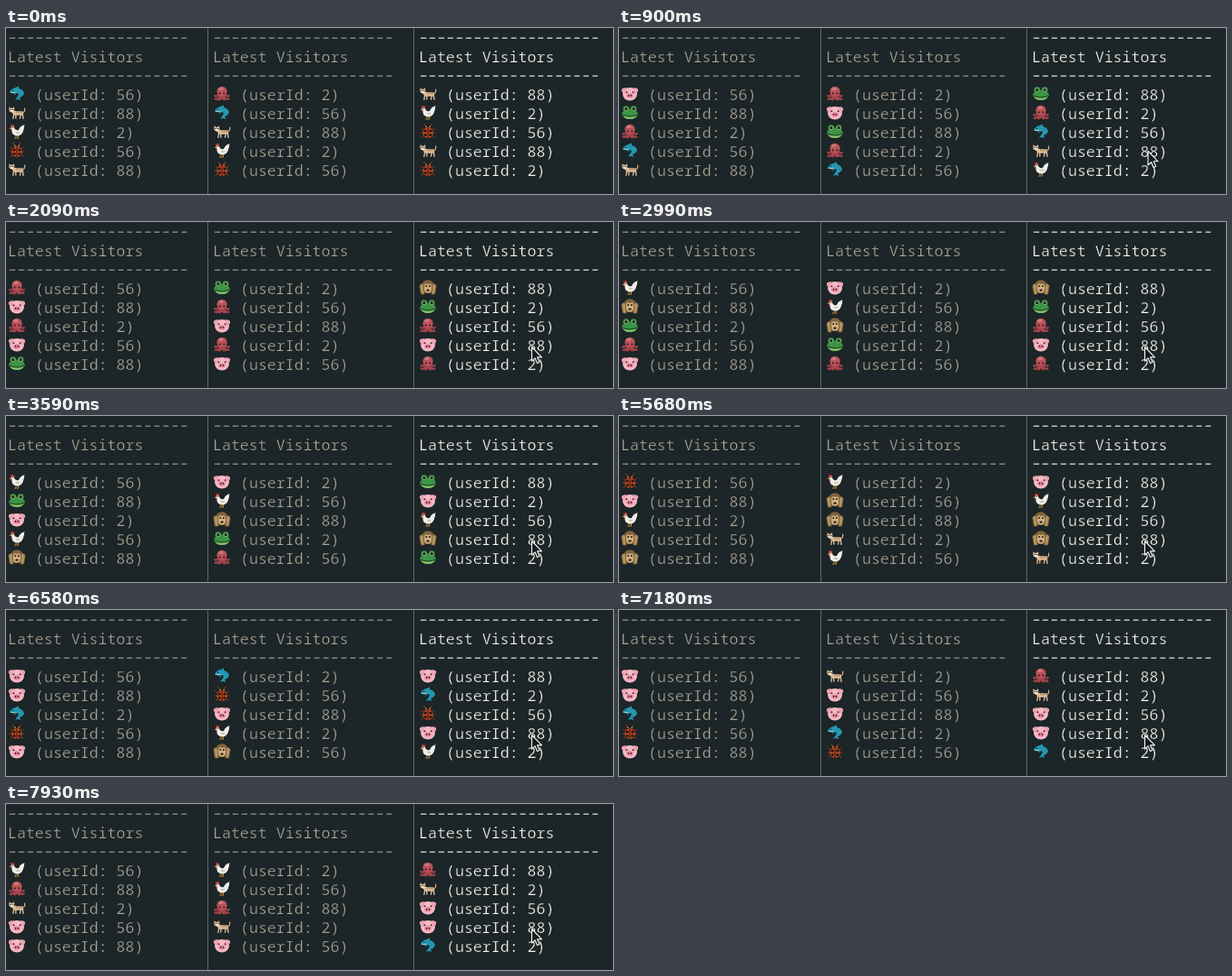
Recreate the animation shown at these times as an HTML page. Size 669x184 px, loop 8000 ms.

```html
<!DOCTYPE html>
<html lang="en">
<head>
<meta charset="utf-8">
<title>Latest Visitors</title>
<style>
  html, body { margin: 0; width: 100%; height: 100%; overflow: hidden; background: #1c2527; }
  svg { display: block; }
  /* A hairline in the background colour thins the letters. */
  text { font: 300 16.6px "Noto Sans Mono", "DejaVu Sans Mono", monospace; stroke: #1c2527; stroke-width: .25; }
  .rule { font-size: 22px; letter-spacing: -3.24px; stroke-width: .6; }
  .pane { fill: #aaa396; }
  .pane.active { fill: #f8f5ec; }
</style>
</head>
<body>
<svg id="stage" width="669" height="184" viewBox="0 0 669 184">
  <defs>
    <symbol id="pig" viewBox="0 0 20 20">
      <ellipse cx="10" cy="10.8" rx="7.9" ry="7.2" fill="#f4b9c5"/>
      <path d="M.8 5.6Q3 2.6 7.4 4.2Q5.4 6 4.4 10.6Q.8 9.6 .8 5.6ZM19.2 5.6Q17 2.6 12.6 4.2Q14.6 6 15.6 10.6Q19.2 9.6 19.2 5.6Z" fill="#eda5b3"/>
      <ellipse cx="10" cy="12.4" rx="3.8" ry="2.7" fill="#e58a9e"/>
      <g fill="#4a2026">
        <circle cx="6.4" cy="8.8" r="1"/><circle cx="13.6" cy="8.8" r="1"/>
        <ellipse cx="8.6" cy="12.4" rx=".8" ry="1.1"/><ellipse cx="11.4" cy="12.4" rx=".8" ry="1.1"/>
      </g>
    </symbol>

    <symbol id="frog" viewBox="0 0 20 20">
      <g fill="#3c9445">
        <circle cx="5.8" cy="6.2" r="3.4"/><circle cx="14.2" cy="6.2" r="3.4"/>
        <ellipse cx="10" cy="11.8" rx="8.8" ry="5.8"/>
      </g>
      <path d="M2.4 13.6Q10 17 17.6 13.6Q15.4 17.6 10 17.6Q4.6 17.6 2.4 13.6Z" fill="#86bf68"/>
      <path d="M1.8 12.4Q10 16.2 18.2 12.4" fill="none" stroke="#1c4522" stroke-width="1.1"/>
      <g fill="#d5dfb4"><circle cx="5.8" cy="6.2" r="2"/><circle cx="14.2" cy="6.2" r="2"/></g>
      <g fill="#15200f"><circle cx="5.8" cy="6.2" r="1.6"/><circle cx="14.2" cy="6.2" r="1.6"/></g>
    </symbol>

    <symbol id="octopus" viewBox="0 0 20 20">
      <g fill="none" stroke="#a5434b" stroke-width="2.2" stroke-linecap="round">
        <path d="M6 11Q4.5 14 2.2 12.6M14 11Q15.5 14 17.8 12.6"/>
        <path d="M7.5 12Q7 17 2.6 16.2M12.5 12Q13 17 17.4 16.2M9 13Q9.3 16.5 7.2 16.8M11 13Q10.7 16.5 12.8 16.8"/>
      </g>
      <ellipse cx="10" cy="7.8" rx="5.6" ry="5.6" fill="#b9525a"/>
      <ellipse cx="9" cy="5" rx="2.8" ry="1.7" fill="#cf7878"/>
      <g fill="#2a1014"><circle cx="7.7" cy="10" r=".9"/><circle cx="12.3" cy="10" r=".9"/></g>
    </symbol>

    <symbol id="dolphin" viewBox="0 0 20 20">
      <path d="M1.8 8.8Q4 4.6 8 3.8L12 2L12.2 4.4Q17.6 6 18 10.4Q16.4 13.4 13 14.4L14.4 17.6L11.4 16.4L8 17.2L10.4 13.8Q13 11.4 10.6 9.6Q7 9.2 4 9.6Z" fill="#2496b0"/>
      <path d="M2.2 8.9Q6 7.6 10.8 9.2Q8 10.6 4 9.6Z" fill="#97d0d8"/>
      <path d="M8 8.8L7 12.4L10.4 9.4Z" fill="#1d7890"/>
      <circle cx="5.6" cy="7" r=".7" fill="#0b2430"/>
    </symbol>

    <symbol id="cat" viewBox="0 0 20 20">
      <g fill="none" stroke-linecap="round">
        <path d="M16.8 10Q19.2 9.4 18.6 5.6" stroke="#cfa67c" stroke-width="1.3"/>
        <path d="M6.6 12L5.8 16.8M8.8 12.6V16.6M14.4 12.6L13.4 16.6M16.3 11.4L17 16.8" stroke="#d9b997" stroke-width="1.4"/>
      </g>
      <path d="M4 8.6Q9 8.4 15.8 8.8Q17.8 10 17 13Q12 13.6 6.4 13.2Z" fill="#dcbc96"/>
      <path d="M1.6 3.8L3.2 5.2H5.4L7 3.8L7.4 7.8Q7 10 4.5 10Q1.6 10 1.4 7.6Z" fill="#e3c9a8"/>
      <path d="M2.8 8Q4.4 7.2 6.2 8Q5.8 10 4.5 10Q3.2 10 2.8 8Z" fill="#f4e8d8"/>
      <path d="M10 8.5V11M12.3 8.6V11M14.6 8.7V11" stroke="#8f6c4c" stroke-width=".9"/>
      <g fill="#2c2218"><circle cx="3.2" cy="7" r=".7"/><circle cx="5.8" cy="7" r=".7"/></g>
    </symbol>

    <symbol id="hen" viewBox="0 0 20 20">
      <path d="M9 14V17.4M11.4 14V17.4M7.2 17.6H9.2M9.8 17.6H11.8" fill="none" stroke="#c98f3a" stroke-width="1"/>
      <path d="M3.8 5Q6.8 3 7.4 7Q9 9.6 12 8.4Q14 3.6 18.6 2.8Q17.4 5 18 6.8Q17 8 17 9.8Q15 15 10.2 15Q5 14.6 4.4 10Z" fill="#efeee8"/>
      <path d="M8.6 10.6Q11.4 9.8 14 10.8Q12.4 13.4 9.4 12.6Z" fill="#cbc8c0"/>
      <path d="M3.2 5L3 2.6L4.6 3.2L5.6 2L6.4 3.2L7.4 3.2L6.8 5Z" fill="#c93a34"/>
      <path d="M3.4 7.6Q5 7.6 4.6 10.2Q3.2 10.6 3.4 7.6Z" fill="#c93a34"/>
      <path d="M4 5.6L1.4 7L4 7.6Z" fill="#dca545"/>
      <circle cx="5.2" cy="6" r=".6" fill="#1d1a18"/>
    </symbol>

    <symbol id="bug" viewBox="0 0 20 20">
      <path d="M7.6 4L5.6 2M12.4 4L14.4 2M5 8.4L2.6 6.6M15 8.4L17.4 6.6M4.4 11.6H2M15.6 11.6H18M5.2 14.6L3 16.8M14.8 14.6L17 16.8" stroke="#6a3a22" stroke-width="1.1" stroke-linecap="round"/>
      <ellipse cx="10" cy="5.4" rx="3.8" ry="2.7" fill="#2a1814"/>
      <ellipse cx="10" cy="11.6" rx="5.7" ry="6" fill="#c24822"/>
      <path d="M10 6V17.4" stroke="#2a1814" stroke-width="1.1"/>
      <g fill="#24130f">
        <circle cx="7" cy="9.6" r="1.6"/><circle cx="13" cy="9.6" r="1.6"/>
        <circle cx="7.2" cy="14" r="1.5"/><circle cx="12.8" cy="14" r="1.5"/>
      </g>
      <g fill="#efc98a"><circle cx="7.8" cy="4.8" r=".8"/><circle cx="12.2" cy="4.8" r=".8"/></g>
    </symbol>

    <symbol id="monkey" viewBox="0 0 20 20">
      <ellipse cx="10" cy="9.2" rx="7.2" ry="7.4" fill="#80633c"/>
      <path d="M10 6.4Q14 4.4 14 8.4Q15.2 16 10 16Q4.8 16 6 8.4Q6 4.4 10 6.4Z" fill="#cfb081"/>
      <g fill="#b3935f" stroke="#6f5534" stroke-width=".7">
        <path d="M2.4 17.6L.8 8.6Q1.4 5.4 4.2 6Q6.4 8 5.4 11.6L6.2 17.6Z"/>
        <path d="M17.6 17.6L19.2 8.6Q18.6 5.4 15.8 6Q13.6 8 14.6 11.6L13.8 17.6Z"/>
      </g>
      <g fill="#2c1a10">
        <circle cx="8.2" cy="8.4" r="1"/><circle cx="11.8" cy="8.4" r="1"/>
        <ellipse cx="10" cy="13.2" rx="1.7" ry="1.1"/>
      </g>
    </symbol>
  </defs>

  <path d="M222.5 0V184M449.5 0V184" stroke="#626a6b"/>
  <g id="panes"></g>
  <path id="cursor" d="M0 0V16.4L3.7 13L6.3 19L9 17.9L6.4 12H11.5Z"
        fill="#151a1b" stroke="#f4f4f4" stroke-width="1.2" stroke-linejoin="round"/>
</svg>

<script>
  const LOOP = 8000, ROWS = 5, LINE = 21, TICK = 149;
  const PANES = [{ x: 2, user: 56 }, { x: 228, user: 2 }, { x: 455, user: 88 }];

  // Shared visit log: time, pane of the visitor, animal.
  const VISITS = [
    [0, 1, "bug"], [0, 2, "cat"], [0, 0, "bug"], [0, 1, "hen"],
    [0, 2, "cat"], [0, 0, "dolphin"], [0, 1, "octopus"],
    [150, 2, "frog"], [600, 0, "pig"], [900, 1, "octopus"],
    [1040, 2, "pig"], [1640, 0, "octopus"], [1940, 1, "frog"],
    [2090, 2, "monkey"], [2540, 0, "hen"], [2990, 1, "pig"],
    [3140, 2, "frog"], [3590, 0, "hen"], [4180, 1, "cat"],
    [4180, 2, "monkey"], [4630, 0, "monkey"], [4930, 1, "hen"],
    [5080, 2, "pig"], [5680, 0, "bug"], [5980, 1, "dolphin"],
    [6130, 2, "pig"], [6580, 0, "pig"], [6880, 1, "cat"],
    [7180, 2, "octopus"], [7630, 0, "hen"], [7930, 1, "hen"]
  ];

  const cursor = document.getElementById("cursor");

  function add(parent, tag, attrs, text = "") {
    const el = document.createElementNS("http://www.w3.org/2000/svg", tag);
    for (const key in attrs) el.setAttribute(key, attrs[key]);
    el.textContent = text;
    return parent.appendChild(el);
  }

  // Each pane shows the log as it stood at its own latest visit.
  function latest(pane, t) {
    let last = 0;
    VISITS.forEach(([at, who], i) => { if (who === pane && at <= t) last = i; });
    return VISITS.slice(last - ROWS + 1, last + 1).reverse();
  }

  const icons = PANES.map(({ x }, p) => {
    const group = add(document.getElementById("panes"), "g", { class: p === 2 ? "pane active" : "pane" });
    const write = (text, line, dx = 0) => add(group, "text", { x: x + dx, y: 17 + line * LINE }, text);
    const rule = line => write("-".repeat(20), line, -1.6).setAttribute("class", "rule");
    rule(0);
    write("Latest Visitors", 1);
    rule(2);
    return latest(p, 0).map(([, who], i) => {
      write(`(userId: ${PANES[who].user})`, i + 3, 30);
      return add(group, "use", { x, y: 62.5 + i * LINE, width: 20, height: 20 });
    });
  });

  function moveCursor(t) {
    const u = Math.min(1, (Math.floor(t / TICK) - 1) / 7);
    const rest = (1 - u) ** 2;
    cursor.setAttribute("visibility", u < 0 ? "hidden" : "visible");
    cursor.setAttribute("transform", `translate(${579.5 + 44 * rest} ${138.5 - 26 * rest}) scale(.95)`);
  }

  function draw(now) {
    const t = now % LOOP;
    icons.forEach((column, p) => latest(p, t).forEach(([, , animal], i) =>
      column[i].setAttribute("href", "#" + animal)));
    moveCursor(t);
  }

  const start = performance.now();
  function frame() {
    draw(performance.now() - start);
    requestAnimationFrame(frame);
  }
  frame();
</script>
</body>
</html>
```
